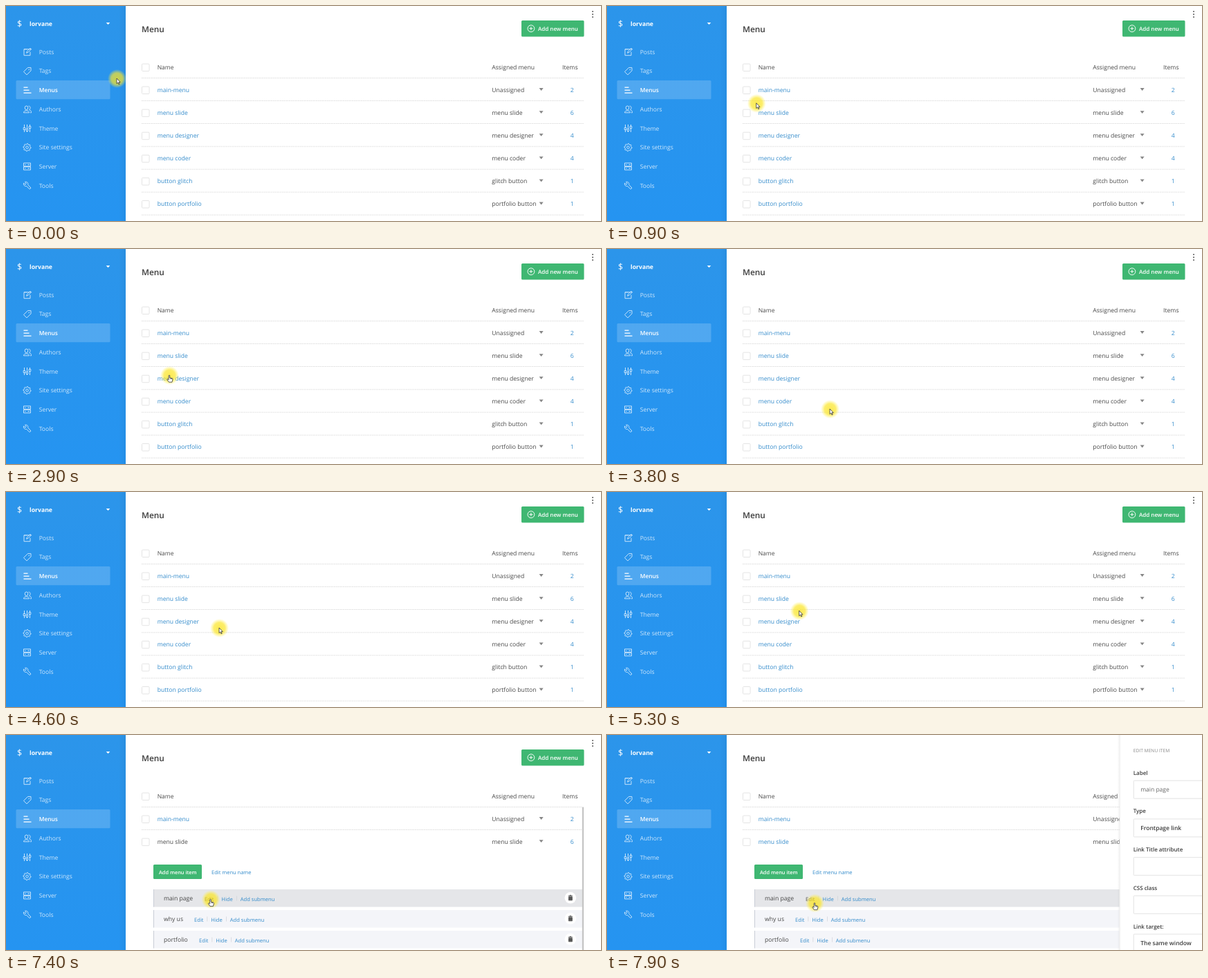
An HTML page for the animation above (8 s loop, 860 px wide and 312 px high).

```html
<!DOCTYPE html>
<html lang="en">
<head>
<meta charset="utf-8">
<title>Menu manager</title>
<style>
  html, body { margin: 0; width: 100%; height: 100%; overflow: hidden; background: #fff; }
  svg { display: block; width: 860px; height: 312px; }
  text { font-family: "Open Sans", "Noto Sans", sans-serif; text-rendering: geometricPrecision; white-space: pre; }
</style>
</head>
<body>
<svg id="stage" viewBox="0 0 860 312">
  <defs>
    <linearGradient id="blue" x2="0" y2="1">
      <stop offset="0" stop-color="#2c95ea"/><stop offset="1" stop-color="#2594f1"/>
    </linearGradient>
    <linearGradient id="shade">
      <stop offset="0" stop-color="#000" stop-opacity="0"/><stop offset="1" stop-color="#000" stop-opacity=".05"/>
    </linearGradient>
    <radialGradient id="glow">
      <stop offset="0" stop-color="#fbe31c" stop-opacity=".76"/>
      <stop offset=".6" stop-color="#fbe62a" stop-opacity=".7"/>
      <stop offset="1" stop-color="#fff04a" stop-opacity="0"/>
    </radialGradient>
    <clipPath id="fold"><rect id="foldBox" x="190" y="170" width="660" height="0"/></clipPath>
  </defs>
</svg>
<script>
const LOOP = 8000, STEP = 100, OPEN_HEIGHT = 240;
const INK = '#474747', LINK = '#338bcb', GREEN = '#3fb772';
const stage = document.getElementById('stage');
const foldBox = document.getElementById('foldBox');
const links = [];

function add(parent, tag, attrs) {
  const node = document.createElementNS('http://www.w3.org/2000/svg', tag);
  for (const key in attrs) node.setAttribute(key, attrs[key]);
  return parent.appendChild(node);
}
const group = (parent, attrs) => add(parent, 'g', attrs);
const rect = (parent, x, y, width, height, attrs) => add(parent, 'rect', { x, y, width, height, ...attrs });
function label(parent, x, y, str, size = 8.65, fill = INK, attrs = {}) {
  const node = add(parent, 'text', { x, y, 'font-size': size, fill, ...attrs });
  node.textContent = str;
  return node;
}
const bold = { 'font-weight': 600 };
function link(parent, x, y, str, size, place) {
  const node = label(parent, x, y, str, size, LINK);
  links.push({ node, x, y, place });
}
const line = (parent, y) =>
  add(parent, 'path', { d: `M196 ${y}H835`, stroke: '#d4d4d4', 'stroke-width': .8, 'stroke-dasharray': '1.6 1' });
const checkbox = (parent, y) =>
  rect(parent, 196.5, y - 5, 10.5, 10.5, { rx: 1, fill: '#fff', stroke: '#dedede', 'stroke-width': .8 });

// Sidebar
const side = group(stage);
rect(side, 0, 0, 173, 312, { fill: 'url(#blue)' });
rect(side, 163, 0, 10, 312, { fill: 'url(#shade)' });
label(side, 16, 29.5, '$', 12.5, '#fff');
label(side, 34, 28.8, 'lorvane', 8.7, '#fff', { 'font-weight': 700 });
add(side, 'path', { d: 'M144.7 24H150.3L147.5 27Z', fill: '#fff' });
rect(side, 14.5, 108, 136, 27.3, { rx: 1.5, fill: '#fff', 'fill-opacity': .18 });

const sideItems = [
  ['Posts', 'M6 -4H-4.5V5H4.5V0M-1 1.5L0 -1L4.5 -5.5L6 -4L1.5 .5ZM0 -4H-4.5'],
  ['Tags', 'M-5 1L1 -5H5.5V-.5L-.5 5.5ZM2.4 -2.4h.6v.6h-.6Z'],
  ['Menus', 'M-5 -4H1M-5 0H3M-5 4H6'],
  ['Authors', 'M-5 5C-5 1 3 1 3 5ZM-3.3 -2A2.3 2.8 0 1 0 1.3 -2A2.3 2.8 0 1 0 -3.3 -2M2 -4.5C5.5 -5 5 0 3 .8C5.5 1.4 6 3 6 5H4.5'],
  ['Theme', 'M-4 -5.5V-1M-4 2V5.5M0 -5.5V1M0 4V5.5M4 -5.5V-3M4 0V5.5M-5.3 -1h2.6v3h-2.6ZM-1.3 1h2.6v3h-2.6ZM2.7 -3h2.6v3h-2.6Z'],
  ['Site settings', gear()],
  ['Server', 'M-5 -5H5V-.5H-5ZM-5 .5H5V5H-5ZM-3.3 -2.7h1.4M-3.3 2.7h1.4M1 -2.7H3.5M1 2.7H3.5'],
  ['Tools', 'M-5 -3.5L-2.5 -1.5L-1.2 -3L-3 -5.3C0 -6 2 -3.5 1.2 -1.3L5.5 3.5L3.6 5.2L-.8 .8C-3.5 1.3 -5.6 -.6 -5 -3.5Z']
];
function gear() {
  const pts = [];
  for (let i = 0; i < 32; i++) {
    const r = i % 4 < 2 ? 5.6 : 4.3, a = i * Math.PI / 16;
    pts.push((r * Math.cos(a)).toFixed(2) + ' ' + (r * Math.sin(a)).toFixed(2));
  }
  return `M${pts.join('L')}ZM-1.8 0A1.8 1.8 0 1 0 1.8 0A1.8 1.8 0 1 0 -1.8 0`;
}
sideItems.forEach(([name, d], i) => {
  const y = 66.7 + i * 27.7, active = name === 'Menus', color = active ? '#fff' : '#cfe7fb';
  add(side, 'path', { d, transform: `translate(30.5 ${y})`, fill: 'none', stroke: color, 'stroke-width': active ? 1.2 : .95 });
  label(side, 47.7, y + 3, name, 8.6, color, active ? { 'font-weight': 600, 'font-size': 8.4 } : {});
});

// Page header
const page = group(stage);
label(page, 196, 38.2, 'Menu', 11.9, '#3c3c3c', bold);
rect(page, 745, 21, 90.5, 23.5, { rx: 1.5, fill: GREEN });
add(page, 'path', {
  d: 'M754 32.7a4.9 4.9 0 1 0 9.8 0a4.9 4.9 0 1 0 -9.8 0M756.4 32.7h5M758.9 30.2v5',
  fill: 'none', stroke: '#fff', 'stroke-width': .95
});
label(page, 769, 35.9, 'Add new menu', 8, '#fff', bold);
for (const cy of [8, 12, 16]) add(page, 'circle', { cx: 848, cy, r: 1.1, fill: '#666' });

// Menu table
checkbox(page, 89);
label(page, 218.7, 91.6, 'Name', 8.5);
label(page, 702.3, 91.6, 'Assigned menu');
label(page, 815.3, 91.6, 'Items', 8.65, INK, { 'text-anchor': 'middle' });
line(page, 104.5);
line(page, 137.5);
const lower = group(page);
line(lower, 170.5);
const menus = [
  ['main-menu', 'Unassigned', 2], ['menu slide', 'menu slide', 6], ['menu designer', 'menu designer', 4],
  ['menu coder', 'menu coder', 4], ['button glitch', 'glitch button', 1], ['button portfolio', 'portfolio button', 1]
];
menus.forEach(([name, assigned, count], i) => {
  const parent = i < 2 ? page : lower, y = 121.5 + i * 33.1;
  checkbox(parent, y + .5);
  link(parent, 218.7, y + 3.1, name, 8.6, i < 2 ? 'top' : 'lower');
  label(parent, 702.3, y + 3.1, assigned);
  add(parent, 'path', { d: `M770.6 ${y - 2.4}h6l-3 3.8Z`, fill: '#858585' });
  label(parent, 818.3, y + 3.1, count, 8.65, LINK, { 'text-anchor': 'middle' });
  if (i > 1) line(parent, y + 16.2);
});

// Unfolded menu
const sub = group(page, { 'clip-path': 'url(#fold)' });
rect(sub, 213, 188, 70, 21, { rx: 1.5, fill: GREEN });
label(sub, 221, 201.5, 'Add menu item', 7.35, '#fff', bold);
link(sub, 297, 201.5, 'Edit menu name', 7.5, 'sub');
const subRows = [['main page', 287], ['why us', 272], ['portfolio', 279]].map(([name, x], i) => {
  const y = 224 + i * 30, base = y + 16.4;
  const back = rect(sub, 213, y, 620, 25.5, {});
  rect(sub, 213, y, 1, 25.5, { fill: '#c9cdd6' });
  label(sub, 228, base, name, 8.65);
  ['Edit', 'Hide', 'Add submenu'].forEach((str, k) => link(sub, x + [0, 24.3, 51.7][k], base + .2, str, 7.6, 'sub'));
  for (const dx of [18.5, 46]) rect(sub, x + dx, y + 9.5, .7, 7, { fill: '#cfd2d8' });
  add(sub, 'circle', { cx: 815.8, cy: y + 12.3, r: 8.3, fill: '#fff' });
  add(sub, 'path', {
    d: `M812.7 ${y + 9.3}h6.2M814.6 ${y + 8.5}h2.4M813.3 ${y + 10.8}h5v5h-5Z`,
    fill: '#555', stroke: '#555', 'stroke-width': .9
  });
  return { back, y };
});
const edge = rect(page, 832.8, 105, 2.2, 207, { fill: '#c4c4c4' });

// Sliding form
const panel = group(stage);
rect(panel, -3, 0, 3, 312, { fill: 'url(#shade)' });
rect(panel, 0, 0, 400, 312, { fill: '#fff' });
rect(panel, 0, 0, .8, 312, { fill: '#e6e6e6' });
label(panel, 20, 25.4, 'EDIT MENU ITEM', 6.7, '#8b8b8b');
[['Label', 'main page'], ['Type', 'Frontpage link'], ['Link Title attribute', ''], ['CSS class', ''],
 ['Link target:', 'The same window']].forEach(([name, value], i) => {
  const y = 54.7 + i * 55.7;
  label(panel, 20, y + 3, name, 8, '#3c3c3c', bold);
  rect(panel, 20.5, y + 11.5, 300, 26, { rx: 1, fill: '#fff', stroke: '#dcdcdc', 'stroke-width': .8 });
  label(panel, 30.5, y + 27.5, value, 8.5, i ? '#3c3c3c' : '#666', i ? bold : {});
});

// Pointer
const pointer = group(stage);
add(pointer, 'circle', { cx: .5, cy: .5, r: 13.5, fill: 'url(#glow)' });
const shape = { fill: '#fff', stroke: '#333', 'stroke-width': .8, 'stroke-linejoin': 'round' };
const arrow = add(pointer, 'path', { d: 'M0 0V7.6L1.8 6L3 8.8L4.2 8.3L3 5.6H5.3Z', ...shape });
const hand = add(pointer, 'path', {
  d: 'M-.8 .6Q0 -.6 .8 .6V4L4 4.6Q5 5 4.9 6.2L4 10.2H-.6L-3 6.7Q-3.2 5.4 -2 5.7L-.8 6.8ZM1.9 4.4V6M3.3 4.6V6', ...shape
});

// time, x, y
const path = [
  [0, 160, 105], [300, 160, 105], [1600, 286, 186], [1800, 287, 187], [2400, 380, 225], [2900, 236, 183],
  [3200, 240, 185], [3800, 322, 232], [4500, 308, 197], [4900, 308, 197], [5600, 258, 156], [6000, 256, 154.5],
  [6700, 256, 155], [7200, 295, 238], [7600, 296, 238.5], [7900, 300, 243.5], [LOOP, 300, 243.5]
];
const clamp = v => Math.max(0, Math.min(1, v));
const smooth = v => v * v * (3 - 2 * v);

function pointAt(t) {
  const i = Math.max(1, path.findIndex(k => k[0] > t));
  const [t0, x0, y0] = path[i - 1], [t1, x1, y1] = path[i];
  const p = smooth(clamp((t - t0) / (t1 - t0)));
  return [x0 + (x1 - x0) * p, y0 + (y1 - y0) * p];
}
const openAt = t => smooth(clamp((t - 6600) / 300));

function hoverAt(t) {
  const [x, y] = pointAt(Math.max(0, t)), open = openAt(t);
  return links.find(l => {
    const live = l.place === 'top' || (l.place === 'sub' ? open === 1 : open === 0);
    return live && x >= l.x && x <= l.x + l.node.getComputedTextLength() + 1 && y >= l.y - 9 && y <= l.y + 4;
  });
}

function draw(t) {
  const open = openAt(t), [x, y] = pointAt(t), over = hoverAt(t), before = hoverAt(t - 200);
  foldBox.setAttribute('height', OPEN_HEIGHT * open);
  lower.setAttribute('transform', `translate(0 ${OPEN_HEIGHT * open})`);
  edge.setAttribute('opacity', open);
  for (const l of links) {
    const held = l.node.textContent === 'menu slide' && t >= 6400 && t < 7600;
    l.node.setAttribute('fill', held || (l === over && l === before) ? INK : LINK);
  }
  for (const row of subRows) {
    const hot = open === 1 && y >= row.y && y <= row.y + 25.5;
    row.back.setAttribute('fill', hot ? '#e5e6e9' : '#f4f5f9');
  }
  const slide = clamp((t - 7600) / 300);
  panel.setAttribute('transform', `translate(${864 - 123.3 * slide ** 1.5} 0)`);
  pointer.setAttribute('transform', `translate(${x} ${y})`);
  arrow.setAttribute('visibility', over ? 'hidden' : 'visible');
  hand.setAttribute('visibility', over ? 'visible' : 'hidden');
}

const start = performance.now();
function tick() {
  const t = (performance.now() - start) % LOOP;
  draw(Math.floor(t / STEP) * STEP);
  requestAnimationFrame(tick);
}
tick();
</script>
</body>
</html>
```
